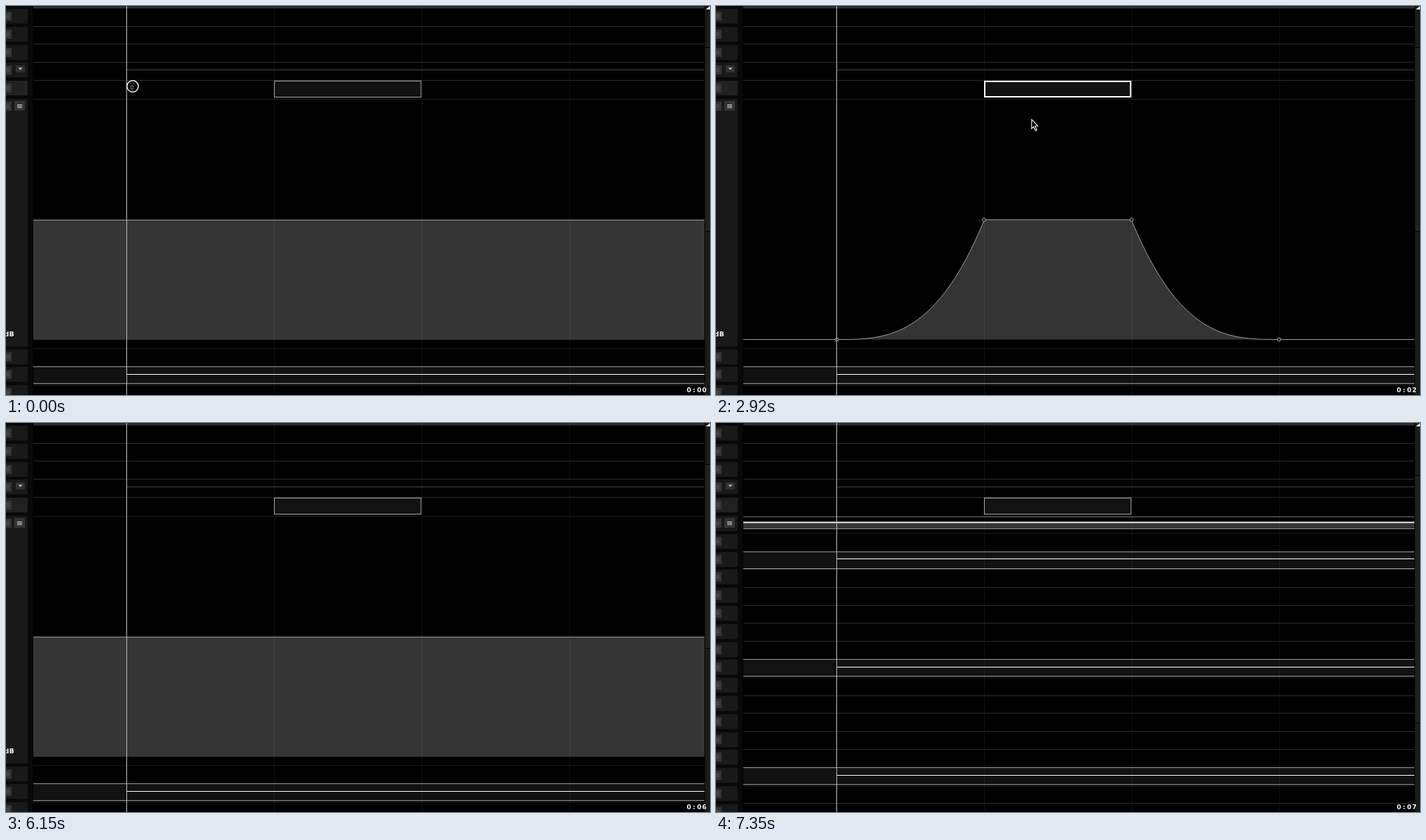
Animation, 1006 px wide and 557 px high, one loop 8 s. Source, as an HTML page with a canvas:

```html
<!DOCTYPE html>
<html lang="en">
<head>
<meta charset="utf-8">
<style>
  html, body { margin: 0; height: 100%; overflow: hidden; background: #000; }
  canvas { display: block; }
</style>
</head>
<body>
<canvas id="stage" width="1006" height="557"></canvas>
<script>
const ctx = document.getElementById('stage').getContext('2d');
const LOOP = 8000, LEFT = 39, RIGHT = 998, PLAYHEAD = 172, ROW = 25.8, LANE_TOP = 134;
const BEATS = [383, 594, 805];

// [start ms, x, y, kind]
const cursors = [
  [0, 181, 115, 'ring'], [140, 177, 108, 'arrow'], [290, 184, 108, 'arrow'],
  [440, 225, 99, 'arrow'], [590, 321, 67, 'arrow'], [740, 355, 69, 'arrow'],
  [880, 355, 66, 'arrow'], [1130, 437, 153, 'arrow'], [1270, 450, 163, 'arrow'],
  [1420, 452, 165, 'arrow'], [1570, 451, 162, 'arrow'], [5010, 455, 152, 'pen'],
  [5260, 410, 175, 'arrow'], [5410, 156, 306, 'arrow'], [5560, 14, 387, 'arrow'],
  [5710, 0, 0, 'none']
];
// [start ms, envelope bottom, lane bottom, scroll thumb top, scroll thumb bottom]
const layouts = [
  [0, 478, 490.5, 59, 322], [7050, 468, 479, 59, 324],
  [7200, 168, 176, 75, 422], [7350, 151.5, 157.8, 75, 429]
];
const seconds = [0, 980, 2020, 3070, 3970, 5110, 6150, 7050];

const at = (steps, t) => steps.filter(s => s[0] <= t).pop();

function box(x, y, w, h, color) {
  ctx.fillStyle = color;
  ctx.fillRect(x, y, w, h);
}
function hline(y, color, x = LEFT) {
  box(x, Math.floor(y), RIGHT - x, 1, color);
}
function path(points, close) {
  ctx.beginPath();
  points.forEach(([x, y]) => ctx.lineTo(x, y));
  if (close) ctx.closePath();
}
function stroke(color, width = 1) {
  ctx.strokeStyle = color;
  ctx.lineWidth = width;
  ctx.stroke();
}
function disc(x, y, r, fill, line, width) {
  ctx.beginPath();
  ctx.arc(x, y, r, 0, 7);
  if (fill) { ctx.fillStyle = fill; ctx.fill(); }
  stroke(line, width);
}
// Wide fixed-pitch lettering; x is the centre of the first character.
function label(text, x, y) {
  ctx.font = 'bold 9px "DejaVu Sans", sans-serif';
  ctx.textAlign = 'center';
  ctx.fillStyle = '#fff';
  [...text].forEach((char, i) => ctx.fillText(char, x + i * 7.3, y));
}

function trackPanel(y, h, color = '#191919') {
  y = Math.round(y);
  box(0, y, 31, h, color);
  box(0, y + 4, 8, 13, '#343434');
  for (let line = 8; line < 14; line += 2) box(0, y + line, 5, 1, '#505050');
}

function drawPanels(laneBottom) {
  box(0, 0, LEFT - 1, 557, '#090909');
  for (let i = 0; i < 5; i++) trackPanel(4 + i * ROW, 21, i === 4 ? '#212121' : '#191919');
  trackPanel(133, laneBottom - 136);
  for (let y = laneBottom + 1; y < 557; y += ROW) trackPanel(y, 21);

  box(14, 85, 13, 10, '#303030');
  path([[17.5, 88.5], [23.5, 88.5], [20.5, 91.5]], true);
  ctx.fillStyle = '#ccc';
  ctx.fill();
  box(12, 136, 15, 14, '#343434');
  for (let y = 141; y < 147; y += 2) box(16, y, 7, 1, '#c8c8c8');
  if (laneBottom > 300) label('dB', 1, laneBottom - 17.5);
}

function drawRows(laneBottom) {
  hline(1, '#666');
  [3, 29, 54, 80, 106].forEach(y => hline(y, '#2d2d2d'));
  hline(91, '#454545', PLAYHEAD);
  hline(133, '#1b1b1b');
  hline(laneBottom, '#181818');
  for (let i = 1, y; (y = laneBottom + i * ROW) < 557; i++) {
    if (i % 6 === 1) {
      const top = Math.round(y), bottom = Math.round(y + 24);
      box(LEFT, top, RIGHT - LEFT, bottom - top, '#121212');
      hline(top, '#9a9a9a');
      hline(bottom, '#9a9a9a');
      hline(Math.round(y + 10.8), '#fff', PLAYHEAD);
    } else hline(y, '#2b2b2b');
  }
}

function drawEnvelope(bottom, shaped, active) {
  const mid = (LANE_TOP + bottom) / 2, base = 477.5, top = 306;
  if (shaped) {
    const rise = [];
    for (let i = 0; i <= 40; i++) rise.push([172.5 + 211 * i / 40, base - (base - top) * (i / 40) ** 3]);
    const fall = rise.map(([x, y]) => [977 - x, y]).reverse();
    path([[LEFT, base], ...rise, ...fall, [RIGHT, base]]);
    ctx.fillStyle = '#343434';
    ctx.fill();
    stroke('#a0a0a0');
    [[172.5, base], [383, top], [594, top], [804.5, base]]
      .forEach(([x, y]) => disc(x, y, 2.4, '#111', '#aaa', 1));
    return;
  }
  box(LEFT, Math.floor(mid), RIGHT - LEFT, Math.round(bottom - mid), '#353535');
  if (!active) return hline(mid, '#999');
  const step = (bottom - LANE_TOP) / 16;
  if (step > 5) for (let i = 1; i < 16; i++) hline(LANE_TOP + i * step, 'rgba(255,255,255,.16)');
  hline(LANE_TOP, '#626262');
  hline(bottom, step > 5 ? '#666' : '#909090');
  box(LEFT, mid - 1.3, RIGHT - LEFT, 1.8, '#fff');
}

function drawScrollbar(top, bottom) {
  box(RIGHT, 0, 8, 557, '#050505');
  box(999, 0, 7, 557, '#1b1b19');
  box(999, top, 7, bottom - top, '#21211f');
  box(999, top, 7, 1, '#000');
  box(999, bottom, 7, 1, '#000');
  path([[1000, 5], [1006, 0], [1006, 5]], true);
  ctx.fillStyle = '#ddd';
  ctx.fill();
}

function drawCursor(x, y, kind) {
  if (kind === 'ring') {
    disc(x, y, 8.2, null, '#fff', 1.4);
    ctx.strokeStyle = '#777';
    ctx.lineWidth = 1;
    ctx.strokeRect(x - 2.5, y - .5, 3, 4);
    path([[x - 4, y - 5], [x - 1, y - 2], [x + 2, y - 5]]);
    stroke('#555');
    path([[x - 4, y + 7], [x - 1, y + 5], [x + 2, y + 7]]);
    stroke('#555');
  } else if (kind === 'pen') {
    path([[x, y + 8.5], [x + 8, y + .5]]);
    stroke('#fff', 1.5);
  } else if (kind === 'arrow') {
    const shape = [[0, 0], [0, 13], [3, 10.5], [5.5, 16], [7.5, 15], [5, 9.5], [9, 9.3]];
    path(shape.map(([dx, dy]) => [x + dx, y + dy + .5]), true);
    ctx.fillStyle = '#000';
    ctx.fill();
    stroke('#fff', 1.1);
  }
}

function draw(t) {
  const [, bottom, laneBottom, thumbTop, thumbBottom] = at(layouts, t);
  const [, x, y, kind] = at(cursors, t);
  box(0, 0, 1006, 557, '#000');
  drawRows(laneBottom);
  drawEnvelope(bottom, t >= 2920 && t < 5010, t >= 6900);
  BEATS.forEach(beat => box(beat, 0, 1, 557, 'rgba(255,255,255,.055)'));

  const selected = t >= 1570 && t < 5010;
  const edge = selected ? 2 : 1;
  box(383, 107, 210.5, 24, selected ? '#fff' : '#a8a8a8');
  box(383 + edge, 107 + edge, 210.5 - 2 * edge, 24 - 2 * edge, '#121212');

  box(PLAYHEAD, 0, 1, 557, '#c0c0c0');
  drawPanels(laneBottom);
  drawScrollbar(thumbTop, thumbBottom);

  if (t >= 1130 && t < 1570) {
    ctx.setLineDash([1, 1]);
    ctx.strokeStyle = '#bbb';
    ctx.lineWidth = 1;
    ctx.strokeRect(355.5, 66.5, x - 355, y - 66);
    ctx.setLineDash([]);
  }
  drawCursor(x, y, kind);
  label('0:0' + (seconds.filter(s => s <= t).length - 1), 976, 552.5);
}

const start = performance.now();
function tick() {
  draw((performance.now() - start) % LOOP);
  requestAnimationFrame(tick);
}
tick();
</script>
</body>
</html>
```
